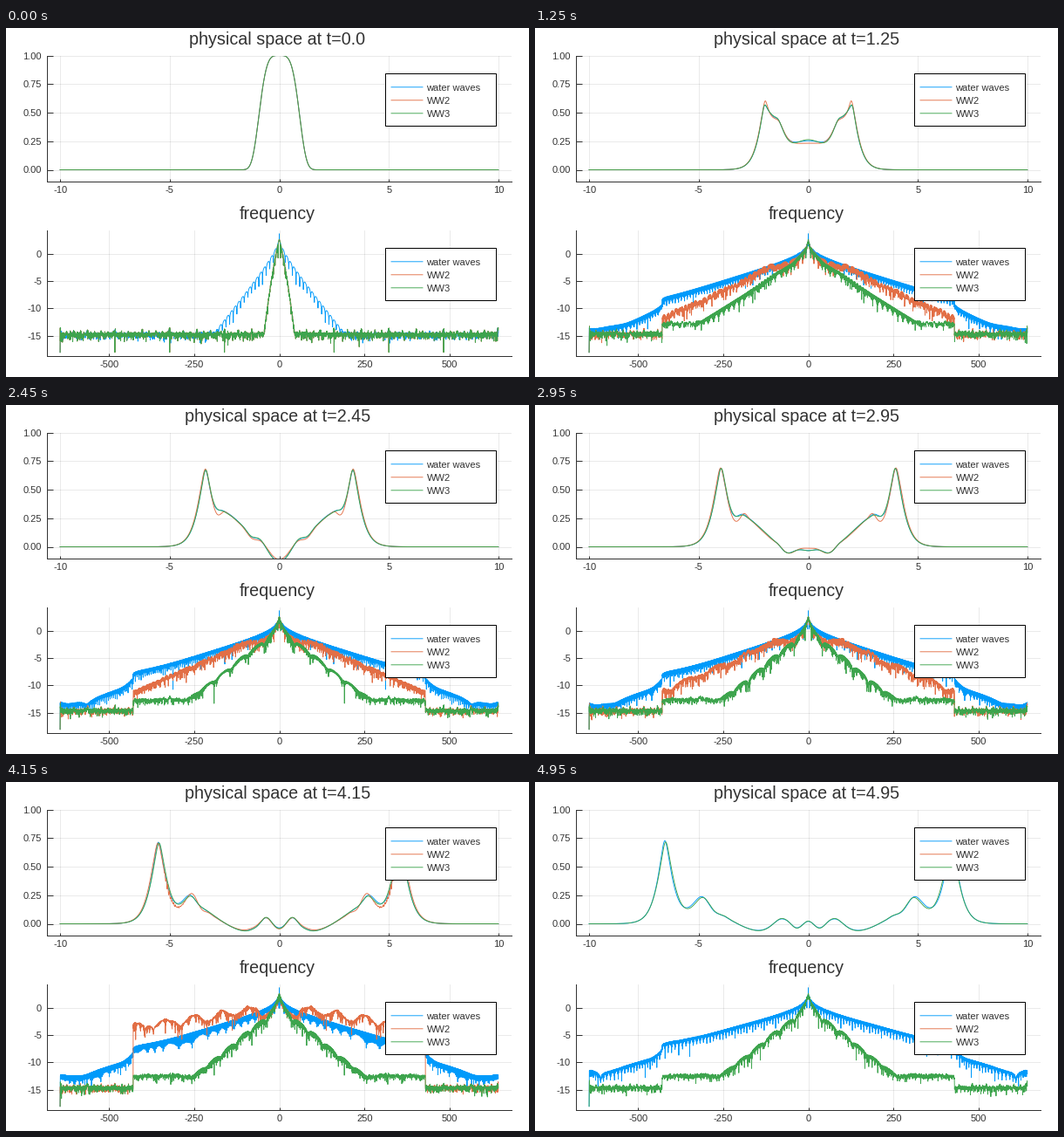
These frames come from a looping animation (600x400 px, 5 s). A matplotlib script:

```python
import numpy as np
import matplotlib.pyplot as plt
from matplotlib.animation import FuncAnimation
from matplotlib.patches import Rectangle

W, H, DPI = 600, 400, 100
PX = 72 / DPI
FRAMES, STEP, SUBSTEPS = 100, 0.05, 12
DT = STEP / SUBSTEPS
NAMES = ["water waves", "WW2", "WW3"]
COLORS = ["#009afa", "#e26f46", "#3da44d"]
INK = "#333333"

# Physical and numerical parameters: shallowness MU, nonlinearity 1
MU, HALF, N, DELTA = 0.1, 10.0, 4096, 0.01
ROOT = np.sqrt(MU)
x = -HALF + 2 * HALF * np.arange(N) / N
k = np.pi / HALF * np.arange(N // 2 + 1)
freq = np.pi / HALF * np.arange(-N // 2, N // 2)
cut = 2 / 3 * k[-1]
keep = (k < cut).astype(float)
dx = 1j * k
dn = k * np.tanh(ROOT * k) / ROOT
smooth = 1 / np.maximum(1, DELTA * k)
# Light damping below the cut-off, strong above it
damp = np.where(k < cut, np.exp(-5 * DT * np.minimum(k / cut, 1) ** 12), 0.1)
rfft, irfft = np.fft.rfft, np.fft.irfft


def bump(s):
    return np.exp(-s ** 4)


def expansion(order):
    """Rectified surface and potential equations up to the given order."""
    def rhs(state):
        e, p = state * keep
        eta, px, w = irfft([smooth * e, dx * p, dn * p])
        a, b, c = rfft([eta * px, eta * w, MU * w ** 2 - px ** 2])
        de = -dx * a - MU * dn * b
        dp = c / 2
        if order > 2:
            pxx, wb = irfft([-k ** 2 * p, dn * b])
            f, g, h = rfft([eta ** 2 * w,
                            eta ** 2 * pxx / 2 + MU * eta * wb,
                            w * (eta * pxx + MU * wb)])
            de += MU * (dn * g - k ** 2 * f / 2)
            dp -= MU * h
        return np.array([dn * state[1] + keep * de,
                         -state[0] + keep * smooth * dp])
    return rhs


def coth(y):
    th = np.tanh(ROOT * k * (1 + y[0].real / N))
    out = np.zeros_like(th)
    out[1:] = 1 / th[1:]
    return th, out


def conformal(state):
    """Full water waves in conformal variables."""
    y, p = state
    th, ct = coth(y)
    kk = ROOT * k
    yx, xx, px, q = irfft([1j * kk * y, kk * ct * y, 1j * kk * p, kk * th * p])
    xx += 1
    jac = xx ** 2 + yx ** 2
    u = q / jac
    r = irfft(-1j * ct * rfft(u))
    dy, dp = rfft([yx * r + xx * u, px * r - (px ** 2 - q ** 2) / (2 * jac)])
    return np.array([dy, dp - y]) / ROOT


def position(y):
    return x + ROOT * irfft(-1j * coth(y)[1] * y)


def conformal_start():
    eta = bump(x)
    for _ in range(120):
        eta = (eta + bump(position(rfft(eta)))) / 2
    return eta


def spectrum(eta, depth):
    amp = np.abs(np.fft.fft(eta))
    amp[0] += N * depth
    amp[N // 2] = 0
    return np.fft.fftshift(np.log10(amp + 1e-18))


def solve(rhs, eta, place, depth=0, decay=1):
    state = np.array([rfft(eta), np.zeros(N // 2 + 1)])
    out = []
    for _ in range(FRAMES):
        out.append((place(state[0]), eta, spectrum(eta, depth)))
        for _ in range(SUBSTEPS):
            k1 = rhs(state)
            k2 = rhs(state + DT / 2 * k1)
            k3 = rhs(state + DT / 2 * k2)
            k4 = rhs(state + DT * k3)
            state = decay * (state + DT / 6 * (k1 + 2 * k2 + 2 * k3 + k4))
        eta = irfft(state[0])
    return out


runs = [solve(conformal, conformal_start(), position, 1, damp),
        solve(expansion(2), bump(x), lambda y: x),
        solve(expansion(3), bump(x), lambda y: x)]

plt.rcParams["font.family"] = "Liberation Sans"
fig = plt.figure(figsize=(W / DPI, H / DPI), dpi=DPI, facecolor="white")


def label(px, py, text, size=8, ha="center"):
    return fig.text(px / W, 1 - py / H, text, size=size, ha=ha,
                    va="baseline", color=INK)


def panel(top, bottom, xlim, ylim, xticks, yticks, yfmt):
    left, right = 47, 580
    ax = fig.add_axes([left / W, 1 - bottom / H,
                       (right - left) / W, (bottom - top) / H])
    ax.set(xlim=xlim, ylim=ylim, xticks=xticks, yticks=yticks)
    ax.patch.set_visible(False)
    ax.set_axisbelow(True)
    ax.grid(color="black", alpha=0.1, lw=0.8 * PX)
    ax.tick_params(direction="in", width=PX, color=INK,
                   labelbottom=False, labelleft=False)
    ax.tick_params(axis="x", length=3 * PX)
    ax.tick_params(axis="y", length=7 * PX)
    for side in ("top", "right"):
        ax.spines[side].set_visible(False)
    for side in ("left", "bottom"):
        ax.spines[side].set(linewidth=PX, color=INK)
    for v in xticks:
        part = (v - xlim[0]) / (xlim[1] - xlim[0])
        label(left + part * (right - left), bottom + 13.5, str(v))
    for v in yticks:
        part = (v - ylim[0]) / (ylim[1] - ylim[0])
        label(41, bottom - part * (bottom - top) + 4, yfmt % v, ha="right")
    return ax


def legend(top):
    for i, (name, color) in enumerate(zip(NAMES, COLORS)):
        py = top + 15.8 + 15 * i
        over.plot([442, 478], [py, py], color=color, lw=0.9 * PX,
                  snap=False, zorder=3)
        over.text(482.5, py + 4, name, size=8, color=INK, va="baseline",
                  zorder=3)
    over.add_patch(Rectangle((435, top), 127, 60, fc="white", ec="black",
                             lw=PX, zorder=2))


space = panel(31.5, 175.6, (-10.6, 10.6), (-0.1, 1.0),
              [-10, -5, 0, 5, 10], [0, 0.25, 0.5, 0.75, 1], "%.2f")
waves = panel(232, 375.8, (-682, 682), (-18.65, 4.25),
              [-500, -250, 0, 250, 500], [-15, -10, -5, 0], "%d")
profiles = [space.plot([], [], color=c, lw=0.9 * PX)[0] for c in COLORS]
spectra = [waves.plot([], [], color=c, lw=0.9 * PX)[0] for c in COLORS]

over = fig.add_axes([0, 0, 1, 1], zorder=5)
over.set(xlim=(0, W), ylim=(H, 0))
over.axis("off")
legend(52)
legend(252)

title = label(311.5, 19, "", 14.2)
label(311.5, 219, "frequency", 14.2)


def draw(i):
    title.set_text(f"physical space at t={round(i * STEP, 2)}")
    for run, profile, spec in zip(runs, profiles, spectra):
        place, eta, amp = run[i]
        profile.set_data(place, eta)
        spec.set_data(freq, amp)
    return [title, *profiles, *spectra]


anim = FuncAnimation(fig, draw, frames=FRAMES, interval=50, repeat=True,
                     repeat_delay=0)
plt.show()
```
